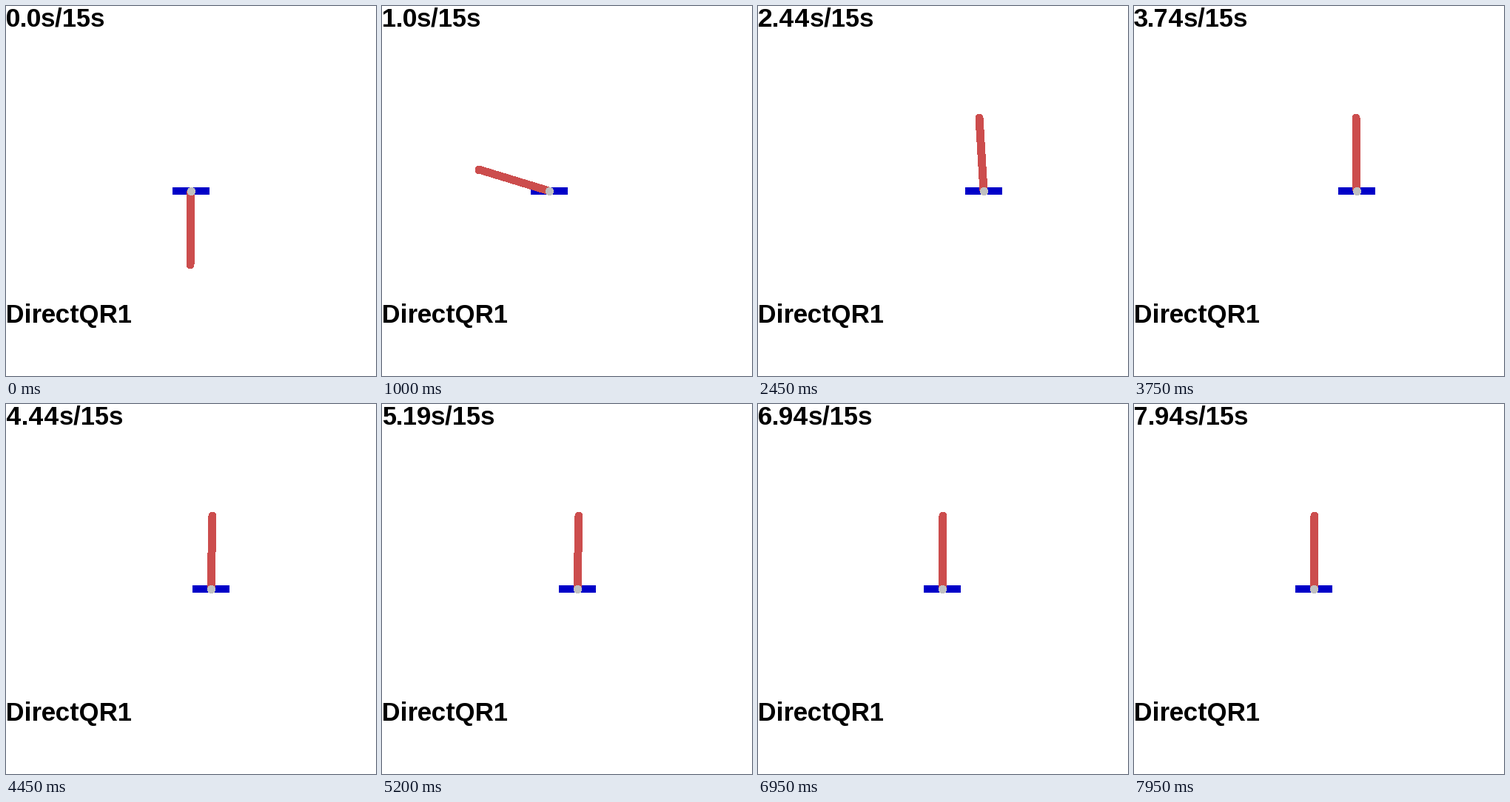
These frames come from a looping animation (500 px wide and 500 px high, 8000 ms). A matplotlib script:

```python
import matplotlib.pyplot as plt
import numpy as np
from matplotlib.animation import FuncAnimation
from matplotlib.patches import Circle, Polygon, Rectangle

SIZE, DPI = 500, 100
FRAMES, STEP_MS = 160, 50
DT = STEP_MS / 1000
AXIS_Y, LENGTH = 250, 99.5
BLUE, RED, GREY = "#0000c8", "#cc4d4d", "#c0c0c0"

# Whole-pixel glyph advances, as in plain screen text.
plt.rcParams["text.hinting_factor"] = 1

# Turning points of the swing-up, then the slow return while balancing.
CART = [(0, 250), (0.35, 205), (0.65, 168), (1, 226), (1.25, 268), (1.5, 255),
        (2, 262), (2.45, 305), (3, 317), (3.75, 301), (4.45, 277),
        (5.95, 257), (7.95, 243)]
# Degrees from hanging, positive to the right.
ANGLE = [(0, -0.5), (0.35, 30), (0.8, -67), (1, -107), (1.3, -10), (1.5, 90),
         (2, 169), (2.45, 183.4), (3, 181.6), (3.75, 180.5), (4.45, 178.9),
         (5.95, 179.4), (7.95, 179.4)]


def smooth(t, keys):
    """Cubic Hermite curve through (time, value) points."""
    times, values = np.array(keys, float).T
    slopes = np.gradient(values, times)
    i = np.clip(np.searchsorted(times, t, side="right") - 1, 0, len(times) - 2)
    h = times[i + 1] - times[i]
    u = (t - times[i]) / h
    return ((1 + 2 * u) * (1 - u) ** 2 * values[i]
            + u * (1 - u) ** 2 * h * slopes[i]
            + u * u * (3 - 2 * u) * values[i + 1]
            + u * u * (u - 1) * h * slopes[i + 1])


grid = np.arange(FRAMES) * DT
cart_x = np.rint(smooth(grid, CART))
angle = np.radians(smooth(grid, ANGLE))
# The clock adds up its steps, so the cut-off readout may lag by 0.01 s.
clock = np.cumsum(np.r_[0, np.full(FRAMES - 1, DT)])

fig = plt.figure(figsize=(SIZE / DPI, SIZE / DPI), dpi=DPI, facecolor="white")
ax = fig.add_axes([0, 0, 1, 1])
ax.set(xlim=(0, SIZE), ylim=(SIZE, 0))
ax.axis("off")


def shape(patch, color, z):
    patch.set(facecolor=color, edgecolor="none", linewidth=0,
              antialiased=False, snap=False, zorder=z)
    return ax.add_patch(patch)


def label(y, text):
    return ax.text(0, y, text, family="Liberation Sans", weight="bold",
                   size=35 * 72 / DPI, color="black", va="baseline")


cart = shape(Rectangle((225, AXIS_Y - 5), 50, 10), BLUE, 1)
pole = shape(Polygon(np.zeros((4, 2)), closed=True), RED, 2)
tip = shape(Circle((0, 0), 5), RED, 3)
hub = shape(Circle((0, 0), 5.1), GREY, 4)
timer = label(28, "")
label(428, "DirectQR1")


def draw(n):
    x, a = cart_x[n], angle[n]
    dx = np.rint(LENGTH * np.sin(a))
    dy = np.rint(LENGTH * np.cos(a))
    # The thick line is widened along one axis only.
    side = np.array([5, 0] if abs(dx) < abs(dy) else [0, 5])
    start = np.array([x, AXIS_Y])
    end = start + (dx, dy)
    cart.set_x(x - 25)
    pole.set_xy([start - side, start + side, end + side, end - side])
    tip.center = (end[0], end[1] + 0.5)
    hub.center = (x + 0.5, AXIS_Y + 0.5)
    timer.set_text(f"{int(clock[n] * 100) / 100}s/15s")
    return cart, pole, tip, hub, timer


anim = FuncAnimation(fig, draw, frames=FRAMES, interval=STEP_MS,
                     repeat=True, repeat_delay=0)
plt.show()
```
